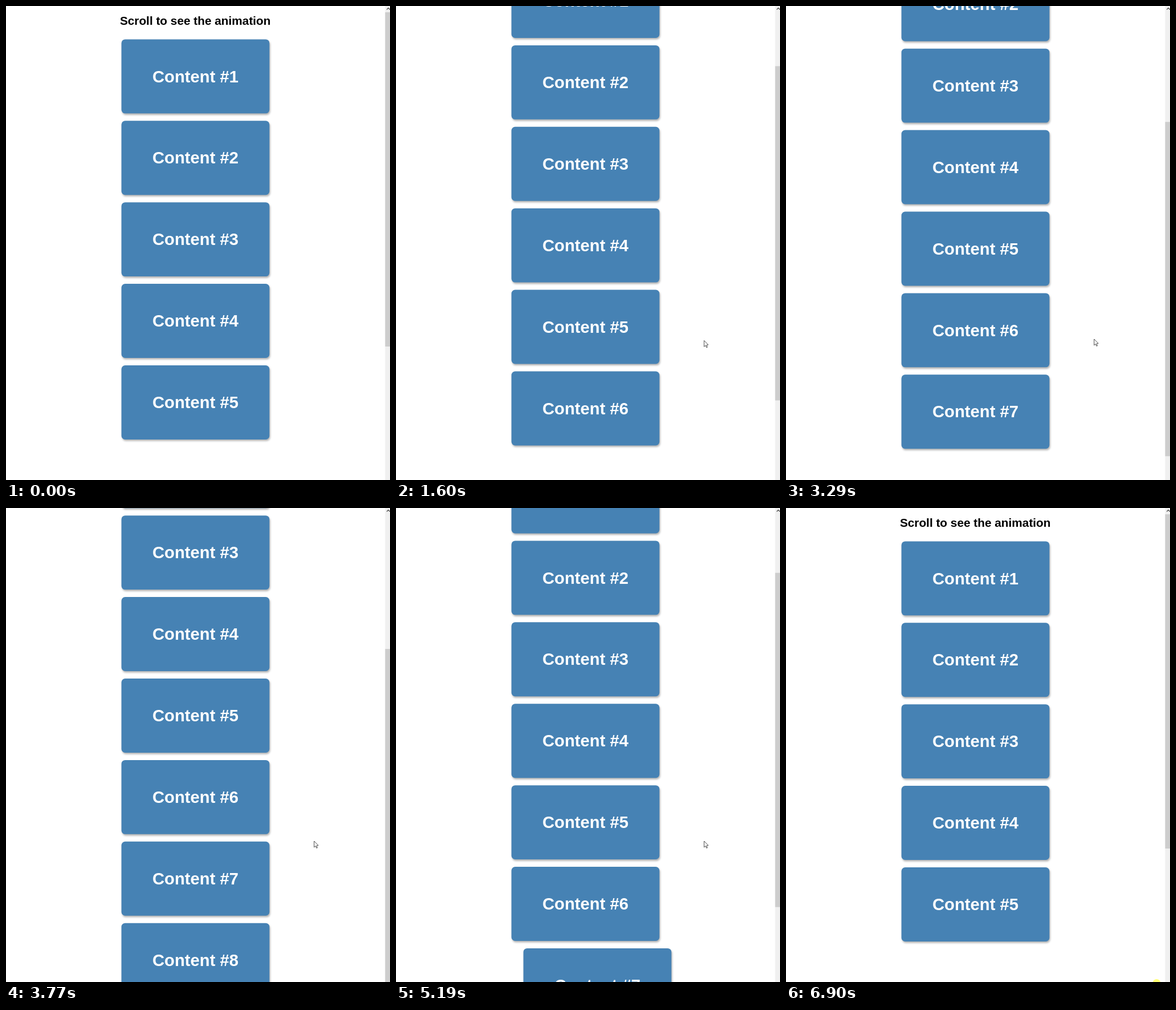
These frames come from a looping animation (674x831 px, 6970 ms). An HTML page with a canvas:

```html
<!DOCTYPE html>
<html lang="en">
<head>
<meta charset="utf-8">
<title>Scroll animation</title>
<style>
  html, body { margin: 0; width: 100%; height: 100%; overflow: hidden; background: #fff; }
  canvas { display: block; }
</style>
</head>
<body>
<canvas id="stage" width="674" height="831"></canvas>
<script>
const W = 674, H = 831, LOOP = 6970;
const ctx = document.getElementById('stage').getContext('2d');
const FONT = '"Liberation Sans", Arial, sans-serif';

const CARD = { x: 202.6, y: 58.4, w: 259.8, h: 129.9, pitch: 142.9, count: 8 };
const CENTER = CARD.x + CARD.w / 2;
const SLIDE = CARD.w * 4, SLIDE_MS = 400;
const STEP = 66.2, MAX_SCROLL = 347.5, WHEEL_MS = 200;

const clamp = (v, lo = 0, hi = 1) => Math.min(hi, Math.max(lo, v));
const lerp = (a, b, p) => a + (b - a) * p;
const sineOut = p => Math.sin(clamp(p) * Math.PI / 2);

// Same curve as CSS cubic-bezier()
function bezier(x1, y1, x2, y2) {
  const at = (a, b, u) => 3 * a * u * (1 - u) ** 2 + 3 * b * u * u * (1 - u) + u ** 3;
  return p => {
    if (p <= 0) return 0;
    if (p >= 1) return 1;
    let lo = 0, hi = 1;
    for (let i = 0; i < 24; i++) {
      const mid = (lo + hi) / 2;
      if (at(x1, x2, mid) < p) lo = mid; else hi = mid;
    }
    return at(y1, y2, lo);
  };
}
const ease = bezier(.25, .1, .25, 1);
const wheelEase = bezier(.25, 0, .6, 1);

// Wheel notches: start time and direction
const wheel = [
  ...[1085, 1360, 2190, 2784, 3265, 4065].map(t => [t, 1]),
  ...[4530, 4735, 4945, 5164, 5615, 5840].map(t => [t, -1])
];

// Times at which the lower cards slide in and out
const slides = { 6: [1113, 5958], 7: [2246, 5177], 8: [3340, 4670] };

function scrollAt(t) {
  let pos = 0, goal = 0;
  for (const [start, dir] of wheel) {
    const next = clamp(goal + dir * STEP, 0, MAX_SCROLL);
    pos += (next - goal) * wheelEase((t - start) / WHEEL_MS);
    goal = next;
  }
  return pos;
}

function offsetAt(n, t) {
  if (!slides[n]) return 0;
  const [enter, leave] = slides[n];
  const shown = ease((t - enter) / SLIDE_MS) - ease((t - leave) / SLIDE_MS);
  return (n % 2 ? 1 : -1) * SLIDE * (1 - shown);
}

function text(str, x, y, size, color) {
  ctx.font = `bold ${size}px ${FONT}`;
  ctx.textAlign = 'center';
  ctx.fillStyle = color;
  ctx.fillText(str, x, y);
}

function drawCard(n, scroll, t) {
  const dx = offsetAt(n, t);
  const x = CARD.x + dx;
  const y = CARD.y + (n - 1) * CARD.pitch - scroll;
  if (x > W || x + CARD.w < -8 || y > H || y + CARD.h < -8) return;
  ctx.save();
  ctx.shadowColor = 'rgba(0,0,0,.3)';
  ctx.shadowOffsetX = 1.3;
  ctx.shadowOffsetY = 2.6;
  ctx.shadowBlur = 3.25;
  ctx.fillStyle = '#4682b4';
  ctx.beginPath();
  ctx.roundRect(x, y, CARD.w, CARD.h, 6.5);
  ctx.fill();
  ctx.restore();
  text('Content #' + n, CENTER + dx, y + CARD.h / 2 + 10.2, 29.25, '#fff');
}

function drawScrollbar(scroll) {
  ctx.fillStyle = '#f0f0f0';
  ctx.fillRect(665.5, 0, 11, H);
  ctx.fillStyle = '#cdcdcd';
  ctx.fillRect(665.5, 11 + scroll * .7135, 11, 586);
  ctx.strokeStyle = '#505050';
  ctx.lineWidth = 1.3;
  ctx.beginPath();
  ctx.moveTo(668.3, 6.2);
  ctx.lineTo(671, 3.5);
  ctx.lineTo(673.7, 6.2);
  ctx.stroke();
}

function cursorAt(t) {
  if (t < 1800) {
    const p = sineOut((t - 170) / 590);
    return [lerp(634, 540.8, p), lerp(845, 586.5, p)];
  }
  if (t < 6160) return [540.8, lerp(586.5, 584, clamp((t - 1800) / 200))];
  const u = sineOut((t - 6160) / 700), v = 1 - u;
  const curve = (a, b, c) => a * v * v + 2 * b * u * v + c * u * u;
  return [curve(540.8, 574, 650.5), curve(584, 732, 833)];
}

function drawCursor(t) {
  const [x, y] = cursorAt(t);
  if (t > 6885) {
    ctx.fillStyle = '#ffff73';
    ctx.beginPath();
    ctx.arc(x, y, 7, 0, Math.PI * 2);
    ctx.fill();
  }
  const shape = [[0, 0], [0, 10.8], [2.5, 8.6], [4.2, 12.3], [5.8, 11.6], [4.2, 8], [7.3, 7.5]];
  ctx.beginPath();
  for (const [px, py] of shape) ctx.lineTo(x + px, y + py);
  ctx.closePath();
  ctx.fillStyle = '#fff';
  ctx.fill();
  ctx.strokeStyle = '#222';
  ctx.lineWidth = .8;
  ctx.stroke();
}

function draw(t) {
  const scroll = scrollAt(t);
  ctx.fillStyle = '#fff';
  ctx.fillRect(0, 0, W, H);
  text('Scroll to see the animation', 332.2, 32.5 - scroll, 20.8, '#000');
  for (let n = 1; n <= CARD.count; n++) drawCard(n, scroll, t);
  drawScrollbar(scroll);
  drawCursor(t);
}

const begin = performance.now();
function tick() {
  draw((performance.now() - begin) % LOOP);
  requestAnimationFrame(tick);
}
tick();
</script>
</body>
</html>
```
